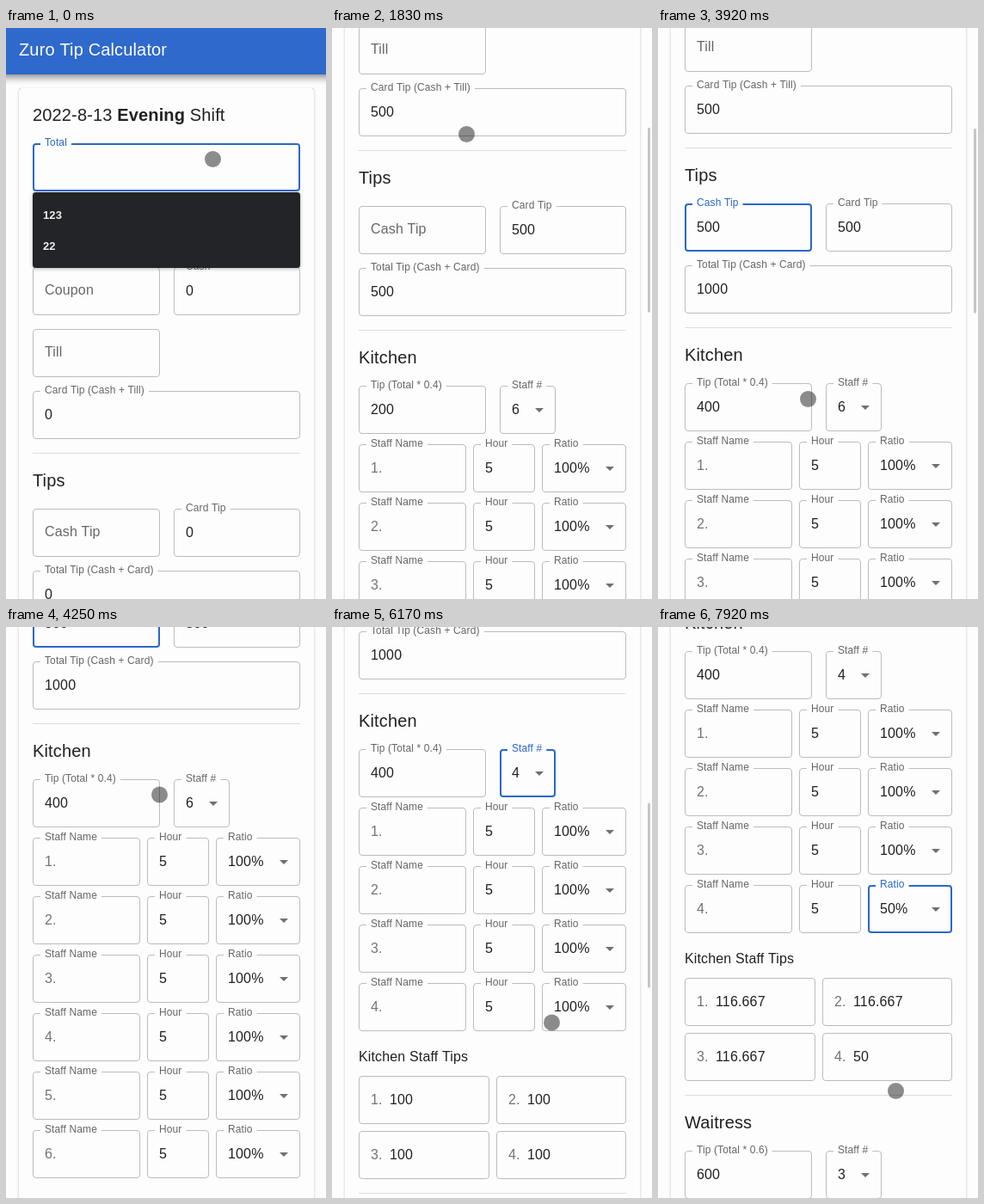
An HTML page with a canvas that plays this animation: 372x664 px, repeating every 8000 ms.

```html
<!DOCTYPE html>
<html lang="en">
<head>
<meta charset="utf-8">
<title>Tip Calculator</title>
<style>
  html, body { margin: 0; width: 100%; height: 100%; overflow: hidden; background: #fdfdfd; }
  canvas { display: block; width: 372px; height: 664px; }
</style>
</head>
<body>
<canvas id="stage"></canvas>
<script>
const W = 372, H = 664, LOOP = 8000;
const BLUE = [44, 103, 200], GRAY = [102, 102, 102];
const INK = '#212121', PAPER = '#fdfdfd', MUTED = '#666';
const FONT = '"Liberation Sans", Arial, sans-serif';

const canvas = document.getElementById('stage');
const ctx = canvas.getContext('2d');
const dpr = window.devicePixelRatio || 1;
canvas.width = W * dpr;
canvas.height = H * dpr;

// Moments of interaction, in ms
const TOTAL_KEYS = [80, 420, 670], CASH_KEYS = [2670, 3000, 3170];
const CASH_FOCUS = 2300;
const STAFF_OPEN = 4888, STAFF_PICK = 5420;
const RATIO_OPEN = 6920, RATIO_PICK = 7620;

const SCROLL = [[1260, 0], [1800, 352], [1830, 352], [2000, 355], [3930, 355], [4260, 592],
  [6060, 592], [6420, 740]];
const POINTER = [[80, 240, 152], [900, 235, 165], [1250, 168, 414], [1780, 156, 123],
  [1880, 156, 123], [2300, 129, 228], [3500, 129, 228], [3920, 174, 431], [4260, 178, 194],
  [4420, 178, 194], [4880, 240, 208], [5000, 242, 266], [5350, 238, 358], [5500, 238, 358],
  [6060, 255, 493], [6420, 255, 345], [6600, 255, 345], [6900, 274, 328], [7020, 274, 328],
  [7500, 276, 532], [7900, 276, 539]];
const POINTER_HIDDEN = [[80, 920], [2670, 3580]];
const SCROLLBAR_SHOWN = [[1270, 2400], [3850, 4250], [6080, 6420]];

const clamp = v => Math.min(1, Math.max(0, v));
const smooth = p => p * p * (3 - 2 * p);
const within = (t, spans) => spans.some(([a, b]) => t >= a && t < b);

// cubic-bezier(.4, 0, .2, 1)
function ease(x) {
  if (x <= 0) return 0;
  if (x >= 1) return 1;
  let lo = 0, hi = 1, u = .5;
  for (let i = 0; i < 18; i++) {
    u = (lo + hi) / 2;
    const at = 1.2 * u * (1 - u) ** 2 + .6 * u * u * (1 - u) + u ** 3;
    if (at < x) lo = u; else hi = u;
  }
  return u * u * (3 - 2 * u);
}

function follow(keys, t) {
  let i = keys.findIndex(k => k[0] > t);
  if (i < 0) return keys[keys.length - 1].slice(1);
  if (i === 0) return keys[0].slice(1);
  const a = keys[i - 1], b = keys[i];
  const p = smooth((t - a[0]) / (b[0] - a[0]));
  return a.slice(1).map((v, n) => v + (b[n + 1] - v) * p);
}

const typed = (text, times, t) => text.slice(0, times.filter(k => t >= k).length);
const number = v => String(+v.toFixed(3));

function text(str, x, y, size = 16, color = INK, weight = 'normal', spacing = size * .0094) {
  ctx.font = `${weight} ${size}px ${FONT}`;
  ctx.letterSpacing = spacing + 'px';
  ctx.fillStyle = color;
  ctx.fillText(str, x, y);
  return ctx.measureText(str).width;
}

const heading = (str, x, y, color, weight) => text(str, x, y, 20, color, weight, .15);

function box(x, y, w, h, r) {
  ctx.beginPath();
  ctx.roundRect(x, y, w, h, r);
}

// Filled panel whose shadow is only painted outside of it
function panel(x, y, w, h, r, fill, blur, dy, strength) {
  ctx.save();
  box(x, y, w, h, r);
  ctx.rect(x - 60, y - 60, w + 120, h + 120);
  ctx.clip('evenodd');
  ctx.shadowColor = `rgba(0,0,0,${strength})`;
  ctx.shadowBlur = blur * dpr;
  ctx.shadowOffsetY = dy * dpr;
  ctx.fillStyle = '#000';
  box(x, y, w, h, r);
  ctx.fill();
  ctx.restore();
  ctx.fillStyle = fill;
  box(x, y, w, h, r);
  ctx.fill();
}

function divider(y) {
  ctx.fillStyle = '#dcdcdc';
  ctx.fillRect(31, y, 311, 1);
}

function arrow(cx, cy, up) {
  const d = up ? -1 : 1;
  ctx.fillStyle = '#707070';
  ctx.beginPath();
  ctx.moveTo(cx - 5, cy - 2 * d);
  ctx.lineTo(cx + 5, cy - 2 * d);
  ctx.lineTo(cx, cy + 3 * d);
  ctx.fill();
}

// Outlined input. lift: 0 = label inside, 1 = label on the border. tint: 0 = gray label, 1 = blue
function field(x, y, w, label, value = '', { lift = 1, focused = false, tint = 0, prefix = '',
  select = false, open = false } = {}) {
  const line = focused ? 2 : 1;
  ctx.lineWidth = line;
  ctx.strokeStyle = focused ? `rgb(${BLUE})` : '#bcbcbc';
  box(x + line / 2, y + line / 2, w - line, 56 - line, 4 - line / 2);
  ctx.stroke();
  if (label) {
    const size = 16 - 4 * lift;
    const color = `rgb(${GRAY.map((g, i) => Math.round(g + (BLUE[i] - g) * tint))})`;
    ctx.font = `${size}px ${FONT}`;
    ctx.letterSpacing = size * .0094 + 'px';
    if (lift > 0) {
      ctx.fillStyle = PAPER;
      ctx.fillRect(x + 9, y - 1, (ctx.measureText(label).width + 10) * lift, 4);
    }
    text(label, x + 14, y + 32 - 29 * lift, size, color);
  }
  if (prefix) text(prefix, x + 14, y + 33, 16, '#737373');
  text(value, x + (prefix ? 36 : 14), y + 33);
  if (select) arrow(x + w - 19, y + 28, open);
}

function menu(x, y, w, items, chosen, t, openAt, closeAt) {
  const height = items.length * 48 + 16;
  const units = height / 36;
  const duration = (4 + 15 * units ** .25 + units / 5) * 10;
  if (t < openAt || t > closeAt + duration) return;
  const grow = duration * .666, closing = t >= closeAt;
  const alpha = closing ? 1 - ease((t - closeAt) / duration) : ease((t - openAt) / duration);
  const scale = closing ? 1 - .25 * ease((t - closeAt - duration / 3) / grow)
    : .75 + .25 * ease((t - openAt) / grow);
  ctx.save();
  ctx.globalAlpha = alpha;
  ctx.translate(x + w / 2, y);
  ctx.scale(scale, scale * scale);
  panel(-w / 2, 0, w, height, 4, '#fff', 12, 4, .36);
  items.forEach((item, i) => {
    const top = 8 + i * 48;
    if (item === chosen) {
      ctx.fillStyle = 'rgba(25,110,210,.25)';
      ctx.fillRect(-w / 2, top, w, 48);
    }
    text(item, 16 - w / 2, top + 30);
  });
  ctx.restore();
}

function suggestions(t) {
  const alpha = 1 - clamp((t - 80) / 150);
  if (!alpha) return;
  ctx.globalAlpha = alpha;
  panel(31, 191, 311, 88, 4, '#232428', 4, 1, .3);
  text('123', 43, 222, 13, '#eee', 'bold');
  text('22', 43, 258, 13, '#eee', 'bold');
  ctx.globalAlpha = 1;
}

function page(t) {
  const total = typed('500', TOTAL_KEYS, t), cashTip = typed('500', CASH_KEYS, t);
  const cash = String(+total), tips = +total + +cashTip;
  const staff = t < STAFF_PICK ? 6 : 4;
  const ratio = t < RATIO_PICK ? '100%' : '50%';
  const kitchen = tips * .4;
  const focus = (from, to) => ({
    focused: t >= from && t < to,
    tint: ease((t - from) / 200) * (1 - ease((t - to) / 200))
  });

  panel(15, 70, 343, 1990, 4, PAPER, 3, 1, .25);
  panel(-10, -10, W + 20, 64, 0, '#2f69cb', 9, 3, .5);
  heading('Zuro Tip Calculator', 15, 32, '#fff');

  let x = 31;
  x += heading('2022-8-13 ', x, 108);
  x += heading('Evening', x, 108, INK, 'bold');
  heading(' Shift', x, 108);

  field(31, 134, 311, 'Total', total, focus(-1000, CASH_FOCUS));
  field(31, 206, 148, 'Credit', '', { lift: 0 });
  field(195, 206, 147, 'Debit', '', { lift: 0 });
  field(31, 278, 148, 'Coupon', '', { lift: 0 });
  field(195, 278, 147, 'Cash', cash);
  field(31, 350, 148, 'Till', '', { lift: 0 });
  field(31, 422, 311, 'Card Tip (Cash + Till)', cash);

  divider(494);
  heading('Tips', 31, 533);
  field(31, 559, 148, 'Cash Tip', cashTip,
    { ...focus(CASH_FOCUS, STAFF_OPEN), lift: ease((t - CASH_FOCUS) / 200) });
  field(195, 559, 147, 'Card Tip', cash);
  field(31, 631, 311, 'Total Tip (Cash + Card)', number(tips));

  divider(703);
  heading('Kitchen', 31, 742);
  field(31, 768, 148, 'Tip (Total * 0.4)', number(kitchen));
  field(195, 768, 65, 'Staff #', String(staff), { ...focus(STAFF_OPEN, RATIO_OPEN),
    select: true, open: t >= STAFF_OPEN && t < STAFF_PICK });

  for (let i = 0; i < staff; i++) {
    const y = 836 + i * 68, active = i === 3;
    field(31, y, 125, 'Staff Name', '', { prefix: `${i + 1}.` });
    field(164, y, 72, 'Hour', '5');
    field(244, y, 98, 'Ratio', active ? ratio : '100%', {
      ...(active && focus(RATIO_OPEN, LOOP + 1000)), select: true,
      open: active && t >= RATIO_OPEN && t < RATIO_PICK });
  }

  const end = 824 + staff * 68;
  text('Kitchen Staff Tips', 31, end + 35);
  const share = kitchen / staff;
  const reduced = share * parseInt(ratio) / 100;
  for (let i = 0; i < staff; i++) {
    const amount = i === 3 ? reduced : (kitchen - reduced) / (staff - 1);
    field(i % 2 ? 191 : 31, end + 52 + (i >> 1) * 64, i % 2 ? 151 : 152, '', number(amount),
      { prefix: `${i + 1}.` });
  }

  const after = end + 60 + staff * 32;
  divider(after);
  heading('Waitress', 31, after + 39);
  field(31, after + 65, 148, 'Tip (Total * 0.6)', number(tips * .6));
  field(195, after + 65, 65, 'Staff #', '3', { select: true });

  suggestions(t);
  menu(195, 824, 65, ['6', '5', '4'], String(staff), t, STAFF_OPEN, STAFF_PICK);
  menu(244, 1096, 98, ['100%', '80%', '70%', '50%'], ratio, t, RATIO_OPEN, RATIO_PICK);
}

function draw() {
  const t = performance.now() % LOOP;
  const scroll = Math.round(follow(SCROLL, t)[0]);
  ctx.setTransform(dpr, 0, 0, dpr, 0, 0);
  ctx.fillStyle = PAPER;
  ctx.fillRect(0, 0, W, H);
  ctx.save();
  ctx.translate(0, -scroll);
  page(t);
  ctx.restore();

  if (within(t, SCROLLBAR_SHOWN)) {
    ctx.fillStyle = '#c6c6c6';
    box(367, 2 + scroll * .3235, 3, 215, 1.5);
    ctx.fill();
  }
  if (!within(t, POINTER_HIDDEN)) {
    const [x, y] = follow(POINTER, t);
    ctx.fillStyle = 'rgba(0,0,0,.45)';
    ctx.beginPath();
    ctx.arc(x + .5, y + .5, 9.5, 0, 2 * Math.PI);
    ctx.fill();
  }
  requestAnimationFrame(draw);
}
draw();
</script>
</body>
</html>
```
